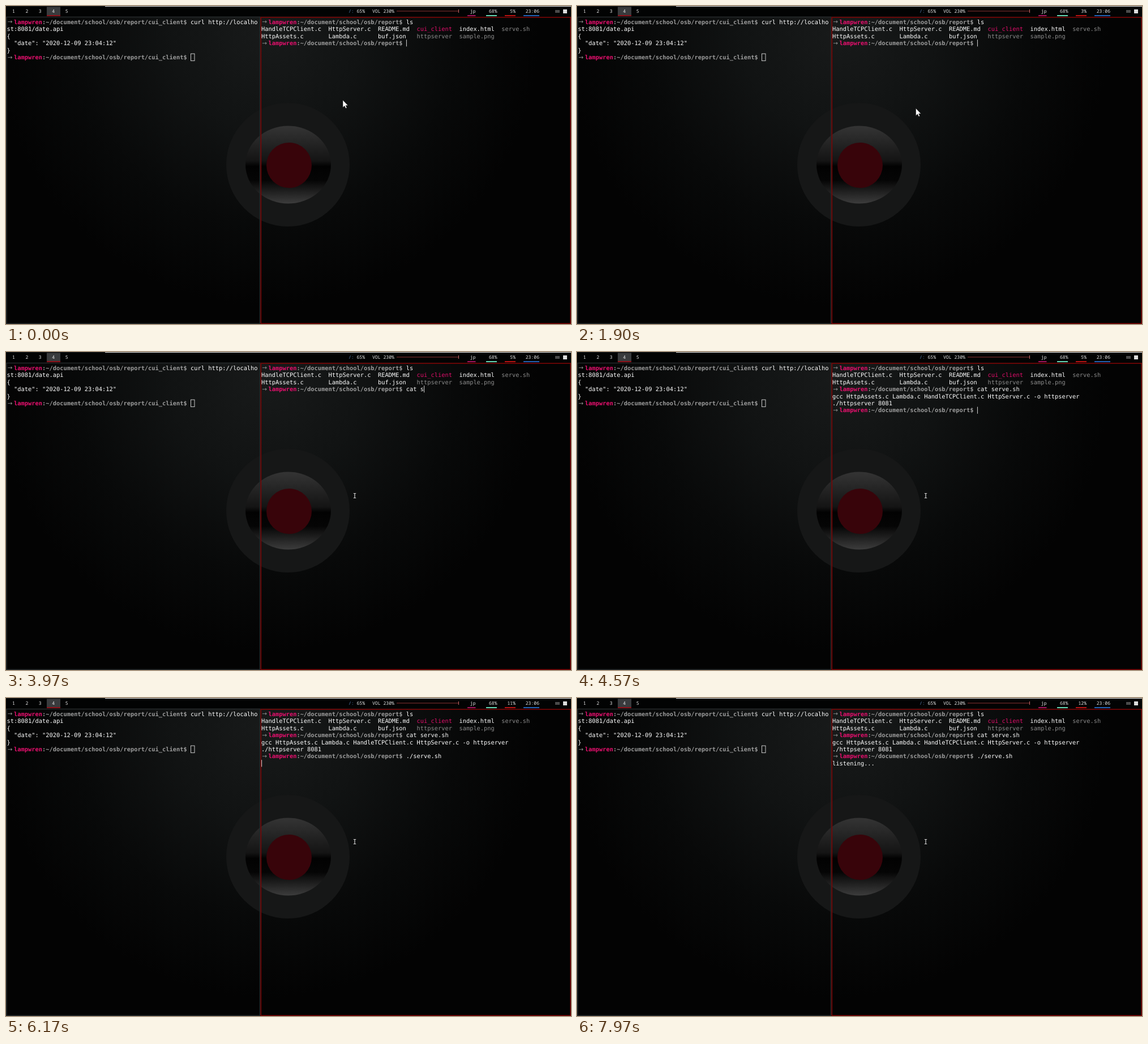
An HTML page for the animation above (8000 ms loop, 998 px wide and 561 px high).

```html
<!DOCTYPE html>
<html lang="en">
<head>
<meta charset="utf-8">
<title>Terminal session</title>
<style>
  html, body { margin: 0; width: 100%; height: 100%; overflow: hidden; background: #000; }
  svg { display: block; width: 998px; height: 561px; }
  text { font: 10.365px "DejaVu Sans Mono", monospace; fill: #fff; white-space: pre; text-rendering: geometricPrecision; }
  .arrow { font-family: "DejaVu Sans", sans-serif; fill: #949494; }
  .user { font-weight: 700; fill: #e9106f; }
  .path { font-weight: 700; fill: #9c9c9c; }
  .dir { fill: #e30e6c; }
  .dim { fill: #8c8c8c; }
  .bar { font: 8.1px "Noto Sans Mono", monospace; fill: #e4e4e4; }
</style>
</head>
<body>
<svg id="stage" viewBox="0 0 998 561">
  <defs>
    <radialGradient id="glow" gradientUnits="userSpaceOnUse" cx="460" cy="50" r="480">
      <stop offset="0" stop-color="#181a1a"/>
      <stop offset=".35" stop-color="#111313"/>
      <stop offset=".7" stop-color="#080909"/>
      <stop offset="1" stop-color="#030303"/>
    </radialGradient>
    <linearGradient id="glass" x2="0" y2="1">
      <stop offset="0" stop-color="#343434"/>
      <stop offset=".45" stop-color="#141414"/>
      <stop offset=".52" stop-color="#020202"/>
      <stop offset=".7" stop-color="#050505"/>
      <stop offset="1" stop-color="#3c3c3c"/>
    </linearGradient>
  </defs>
  <rect width="998" height="561" fill="url(#glow)"/>
  <circle cx="498" cy="280" r="109" fill="#161717"/>
  <ellipse cx="498.5" cy="280" rx="75.5" ry="68.5" fill="url(#glass)"/>
  <circle cx="500" cy="281" r="40" fill="#38040a"/>

  <rect width="998" height="18.5" fill="#020303"/>
  <rect width="175" height="1" fill="#16181a"/>
  <rect x="175" width="823" height="1" fill="#f0f0f0"/>
  <rect x="72" y="1.5" width="24" height="16.5" fill="#393b3d"/>
  <rect x="72" y="16" width="24" height="2" fill="#8e1119"/>
  <path d="M690 9H799" stroke="#8d3434"/>
  <path d="M799.5 6V12" stroke="#c96a6a"/>
  <rect x="970" y="7" width="8" height="5" fill="#4a4a4a"/>
  <rect x="984" y="6" width="7" height="7" fill="#dcdcdc"/>

  <path d="M1 561V19.5H448.5V561M0 560.3H449" fill="none" stroke="#24282a" stroke-width="1.6"/>
  <rect x="450.3" y="20" width="547" height="540.3" fill="none" stroke="#7c0505" stroke-width="1.6"/>
  <rect x="326.5" y="84.2" width="6.5" height="12.4" fill="none" stroke="#c8c8c8"/>

  <g id="text"></g>
  <rect id="caret" width="1" height="12.2" fill="#d4d4d4"/>

  <path id="pointer" d="M0 0V13L3 10.3L5 14.6L7 13.7L5.1 9.5H9Z" fill="#fff" stroke="#111" stroke-width=".5"/>
  <path id="hand" transform="translate(612 247)" d="M3 1.2Q4 0 5 1.2V6L9.8 7.2Q11 8 10.7 10L9.6 13V16H4V13.5L.3 9.3Q-.2 7.5 1.5 8L3 9.3Z" fill="#fff" stroke="#111" stroke-width=".5"/>
  <path id="beam" d="M613.8 249.5H618.2M616 249.5V257.5M613.8 257.5H618.2" fill="none" stroke="#d0d0d0" stroke-width="1.2"/>
</svg>
<script>
const LOOP = 8000, CELL = 6.24, ROW = 12.48, LEFT = 1.6, RIGHT = 451;
const $ = id => document.getElementById(id);
const layer = $('text');

function label(x, y, content, cls = '', anchor = 'start') {
  const el = document.createElementNS('http://www.w3.org/2000/svg', 'text');
  el.setAttribute('x', x);
  el.setAttribute('y', y);
  el.setAttribute('class', cls);
  el.setAttribute('text-anchor', anchor);
  el.textContent = content;
  layer.append(el);
  return el;
}

const put = (x0, col, row, content, cls) =>
  label(x0 + col * CELL, 31.6 + row * ROW, content, cls);

function prompt(x0, row, path, command = '') {
  const end = 11 + path.length;
  return [
    label(x0 + 1.2, 31.4 + row * ROW, '→', 'arrow'),
    put(x0, 2, row, 'lampwren', 'user'),
    put(x0, 10, row, ':' + path + '$', 'path'),
    put(x0, end + 2, row, command)
  ];
}

// Status bar
['1', '2', '3', '4', '5'].forEach((n, i) => label(13.5 + i * 23.4, 12, n, 'bar', 'middle'));
label(605, 12, '/:', 'bar').style.fill = '#5a83b8';
label(634, 12, '65%', 'bar', 'end');
label(647, 12, 'VOL 230%', 'bar');
label(829.5, 12, 'jp', 'bar', 'end');
label(867.5, 12, '68%', 'bar', 'end');
const cpu = label(900, 12, '', 'bar', 'end');
label(942, 12, '23:06', 'bar', 'end');
[[815, 829.5, '#a3125d'], [848, 867, '#67d9b4'], [881, 900, '#b91212'], [914, 942, '#2462b4']]
  .forEach(([from, to, color]) => {
    const line = document.createElementNS('http://www.w3.org/2000/svg', 'path');
    line.setAttribute('d', `M${from} 17H${to}`);
    line.setAttribute('stroke', color);
    line.setAttribute('stroke-width', 2);
    layer.append(line);
  });

// Left terminal
const HOME = '~/document/school/osb/report';
prompt(LEFT, 0, HOME + '/cui_client', 'curl http://localho');
['st:8081/date.api', '{', '  "date": "2020-12-09 23:04:12"', '}']
  .forEach((line, i) => put(LEFT, 0, i + 1, line));
prompt(LEFT, 5, HOME + '/cui_client');

// Right terminal
prompt(RIGHT, 0, HOME, 'ls');
[
  [0, 'HandleTCPClient.c', 'HttpAssets.c'],
  [19, 'HttpServer.c', 'Lambda.c'],
  [33, 'README.md', 'buf.json'],
  [44, 'cui_client', 'httpserver', 'dir', 'dim'],
  [56, 'index.html', 'sample.png', '', 'dim'],
  [68, 'serve.sh', '', 'dim']
].forEach(([col, top, bottom, topClass, bottomClass]) => {
  put(RIGHT, col, 1, top, topClass);
  put(RIGHT, col, 2, bottom, bottomClass);
});
const catCommand = prompt(RIGHT, 3, HOME)[3];
const output = [
  put(RIGHT, 0, 4, 'gcc HttpAssets.c Lambda.c HandleTCPClient.c HttpServer.c -o httpserver'),
  put(RIGHT, 0, 5, './httpserver 8081'),
  ...prompt(RIGHT, 6, HOME)
];
const runCommand = output.at(-1);
const listening = put(RIGHT, 0, 7, 'listening...');

// Steps: [start time, value]
const CPU = [[0, '5%'], [1000, '3%'], [3000, '5%'], [5000, '11%'], [7000, '12%']];
const CAT = [[0, ''], [3300, 'c'], [3430, 'ca'], [3540, 'cat'], [3660, 'cat '],
  [3830, 'cat s'], [4000, 'cat se'], [4170, 'cat serve.sh']];
const RUN = [[0, ''], [5040, '.'], [5170, './'], [5330, './s'], [5450, './se'], [5640, './serve.sh']];
const CAT_DONE = 4400, RUN_DONE = 5900, LISTEN = 7000;

const at = (steps, t) => steps.findLast(([start]) => t >= start)[1];
const show = (el, on) => el.setAttribute('visibility', on ? 'visible' : 'hidden');

function draw(t) {
  cpu.textContent = at(CPU, t);
  const cat = catCommand.textContent = at(CAT, t);
  const run = runCommand.textContent = at(RUN, t);
  output.forEach(el => show(el, t >= CAT_DONE));
  show(listening, t >= LISTEN);

  const [col, row] = t < CAT_DONE ? [41 + cat.length, 3]
    : t < RUN_DONE ? [41 + run.length, 6] : [0, 7];
  $('caret').setAttribute('x', RIGHT + col * CELL + .1);
  $('caret').setAttribute('y', 21.8 + row * ROW);
  show($('caret'), t < LISTEN);

  const p = Math.min(1, Math.max(0, (t - 1700) / 750));
  const ease = p * p * (3 - 2 * p);
  $('pointer').setAttribute('transform', `translate(${595 + 20 * ease} ${166 + 82 * ease})`);
  show($('pointer'), t < 2500);
  show($('hand'), t >= 2500 && t < 3000);
  show($('beam'), t >= 3000);
}

const start = performance.now();
function tick() {
  draw((performance.now() - start) % LOOP);
  requestAnimationFrame(tick);
}
tick();
</script>
</body>
</html>
```
